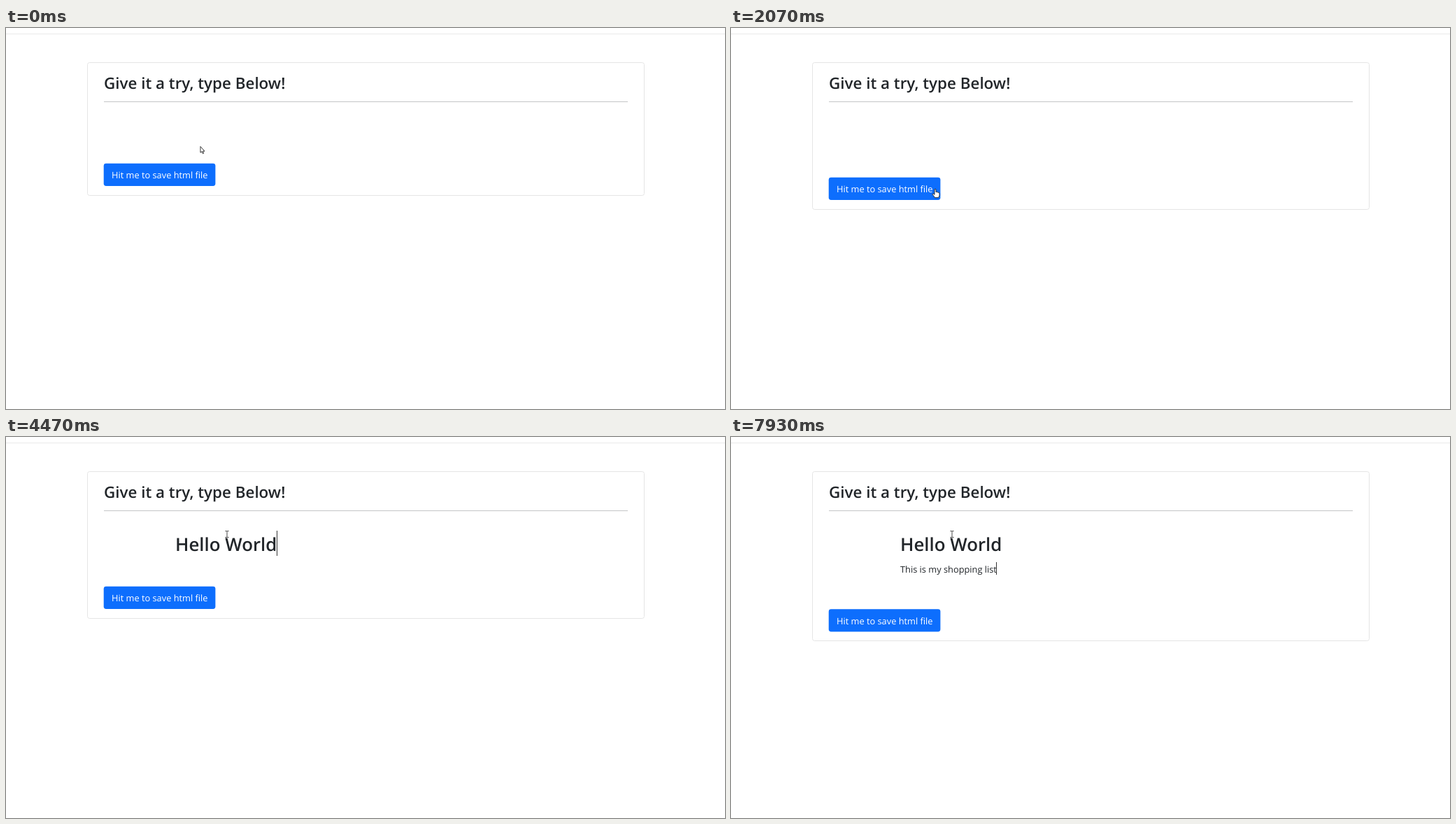
An HTML page for the animation above (8000 ms loop, 1028 px wide and 545 px high).

```html
<!DOCTYPE html>
<html lang="en">
<head>
<meta charset="utf-8">
<title>Block editor demo</title>
<style>
  html, body { margin: 0; width: 100%; height: 100%; overflow: hidden; background: #fff; }
  svg { display: block; width: 1028px; height: 545px; }
  text {
    font-family: "Open Sans", "Noto Sans", sans-serif;
    font-size: 12.8px;
    fill: #212529;
    white-space: pre;
    text-rendering: geometricPrecision;
  }
  .title { font-size: 22.4px; font-weight: 600; }
  .big { font-size: 25.85px; font-weight: 600; }
  .label { fill: #fff; }
  .tip { font-size: 10.4px; fill: #cdd1e0; text-anchor: middle; }
  .key { font-size: 9.3px; fill: #707684; }
  .tab { fill: none; stroke: #8a8e9a; stroke-width: .9; }
  .line { shape-rendering: crispEdges; }
  .pointer { fill: #fff; stroke: #222; stroke-width: .9; stroke-linejoin: round; }
  #tip { filter: drop-shadow(0 5px 4px rgba(29, 32, 43, .35)); }
  #plus path { stroke: #1d202b; stroke-width: 1.7; stroke-linecap: round; }
</style>
</head>
<body>
<svg viewBox="0 0 1028 545">
  <rect class="line" y="8" width="1028" height="1" fill="#eaeaea"/>
  <rect id="card" x="116.5" y="49.5" width="796" height="190" rx="3" fill="#fff" stroke="#e5e5e5"/>
  <text class="title" x="140" y="87">Give it a try, type Below!</text>
  <rect class="line" x="140" y="105" width="749" height="1" fill="#c4c5c6"/>

  <text id="head" class="big" x="242" y="163.4"></text>
  <text id="para" x="242" y="193.8"></text>
  <rect id="caret" class="line" width="1" fill="#333"/>

  <g id="button">
    <rect x="139.7" y="193.8" width="159.7" height="32.1" rx="3.4" fill="#0d6efd"/>
    <text class="label" x="151" y="215.4">Hit me to save html file</text>
  </g>

  <g id="plus">
    <rect id="hover" x="-11.5" y="-11" width="23" height="22" rx="5.5" fill="#eff2f5"/>
    <path d="M-4.8 0H4.8M0-4.8V4.8"/>
  </g>

  <g id="tip">
    <path d="M222 156L226.5 151L231 156Z" fill="#1d202b"/>
    <rect x="205.5" y="155" width="42.5" height="34" rx="6" fill="#1d202b"/>
    <text class="tip" x="226.5" y="169.6">Add</text>
    <path class="tab" d="M214 180H219.5M217.6 178.2L219.5 180L217.6 181.8M221.3 177.8V182.2"/>
    <text class="tip key" x="231.6" y="183.4">Tab</text>
  </g>

  <g id="cursor">
    <path id="arrow" class="pointer" d="M0 .5V9.3L2 7.6L3.4 10.8L4.7 10.2L3.4 7.2H6Z"/>
    <path id="hand" class="pointer" d="M-1 1Q0-.4 1 1V4.6Q2.2 4 2.7 5Q4 4.5 4.5 5.5Q6 5.2 6 6.8V9.4Q5.6 11 4.8 12.7H-.7Q-1.5 10.6-4 8.2Q-3.9 6.6-2.4 7.2L-1 8.4Z"/>
    <path id="beam" d="M-2.5-4.5H-.5L0-4L.5-4.5H2.5M0-4V4M-2.5 4.5H-.5L0 4L.5 4.5H2.5" fill="none" stroke="#333" stroke-width=".9"/>
  </g>
</svg>
<script>
const LOOP = 8000, RATE = 15, BLINK = 530;
const el = id => document.getElementById(id);
const show = (id, on) => el(id).setAttribute('visibility', on ? 'visible' : 'hidden');
const move = (id, x, y) => el(id).setAttribute('transform', `translate(${x} ${y})`);
const within = (t, a, b) => t >= a && t < b;
const clamp = v => Math.max(0, Math.min(1, v));

// Pointer moves: start, end, destination
const start = [278, 169];
const moves = [
  [0, 267, 256, 127],
  [533, 800, 233, 134.5],
  [1267, 1867, 292, 230],
  [2067, 2400, 316, 139]
];

// Typing: time and text from that time on
const heading = [
  [3130, 'H'], [3270, 'He'], [3330, 'Hel'], [3470, 'Hell'], [3670, 'Hello'], [3730, 'Hello '],
  [3870, 'Hello W'], [4000, 'Hello Wor'], [4130, 'Hello Worl'], [4330, 'Hello World'],
  [4400, 'Hello World '], [4470, 'Hello World']
];
const paragraph = [
  [4930, 'T'], [5000, 'Th'], [5130, 'Thi'], [5270, 'This '], [5470, 'This i'], [5670, 'This is'],
  [5730, 'This is '], [5870, 'This is m'], [5930, 'This is my'], [6070, 'This is my '],
  [6470, 'This is my s'], [6530, 'This is my sh'], [6730, 'This is my sho'], [6800, 'This is my shop'],
  [7000, 'This is my shopp'], [7130, 'This is my shoppi'], [7330, 'This is my shoppin'],
  [7470, 'This is my shopping'], [7530, 'This is my shopping '], [7600, 'This is my shopping li'],
  [7670, 'This is my shopping lis'], [7800, 'This is my shopping list'],
  [7870, 'This is my shopping list '], [7930, 'This is my shopping list']
];

function pointerAt(t) {
  let [x, y] = start;
  for (const [a, b, toX, toY] of moves) {
    const p = clamp((t - a) / (b - a)), k = p * p * (3 - 2 * p);
    x += (toX - x) * k;
    y += (toY - y) * k;
  }
  return [x, y];
}

function shapeAt(t, x, y) {
  if (t < 600) return y < 150 ? 'beam' : 'arrow';
  if (t < 1300) return x < 240 ? 'hand' : 'beam';
  if (y > 214 || t < 2130) return 'hand';
  return y < 172 ? 'beam' : 'arrow';
}

// Writes the text typed so far and returns the time of the last key
function type(id, keys, t) {
  let last = 0, text = '';
  for (const [at, value] of keys) if (t >= at) [last, text] = [at, value];
  if (el(id).textContent !== text) el(id).textContent = text;
  return last;
}

function placeCaret(t, headKey, paraKey) {
  const low = t >= 4730, id = low ? 'para' : 'head';
  const since = t - Math.max(headKey, paraKey, low ? 4730 : 2130);
  const c = el('caret');
  const width = el(id).textContent ? el(id).getComputedTextLength() : 0;
  c.setAttribute('x', Math.floor(242 + width));
  c.setAttribute('y', low ? 179 : 134);
  c.setAttribute('height', low ? 18 : 36);
  show('caret', since >= 0 && since % (2 * BLINK) < BLINK + 5);
}

function draw(now) {
  const step = Math.floor((now % LOOP + 4) * RATE / 1000);
  const t = step * 1000 / RATE + 4;

  const drop = t >= 4730 ? 52.5 : t >= 2067 ? 20 : 0;
  el('card').setAttribute('height', 190 + Math.floor(drop));
  move('button', 0, drop);

  const [x, y] = pointerAt(t), shape = shapeAt(t, x, y);
  move('cursor', x, y);
  for (const s of ['arrow', 'hand', 'beam']) show(s, s === shape);

  show('plus', within(t, 200, 2067) || within(t, 2130, 3267));
  move('plus', 226.8, t < 2100 ? 135.6 : 152);
  show('hover', t < 1400 && within(t, 600, 1400) && shape === 'hand');
  el('tip').setAttribute('opacity', t < 1300 ? clamp((t - 950) / 150) : clamp((1470 - t) / 150));

  placeCaret(t, type('head', heading, t), type('para', paragraph, t));
}

let origin;
function tick(now) {
  origin ??= now;
  draw(now - origin);
  requestAnimationFrame(tick);
}
draw(0);
requestAnimationFrame(tick);
</script>
</body>
</html>
```
